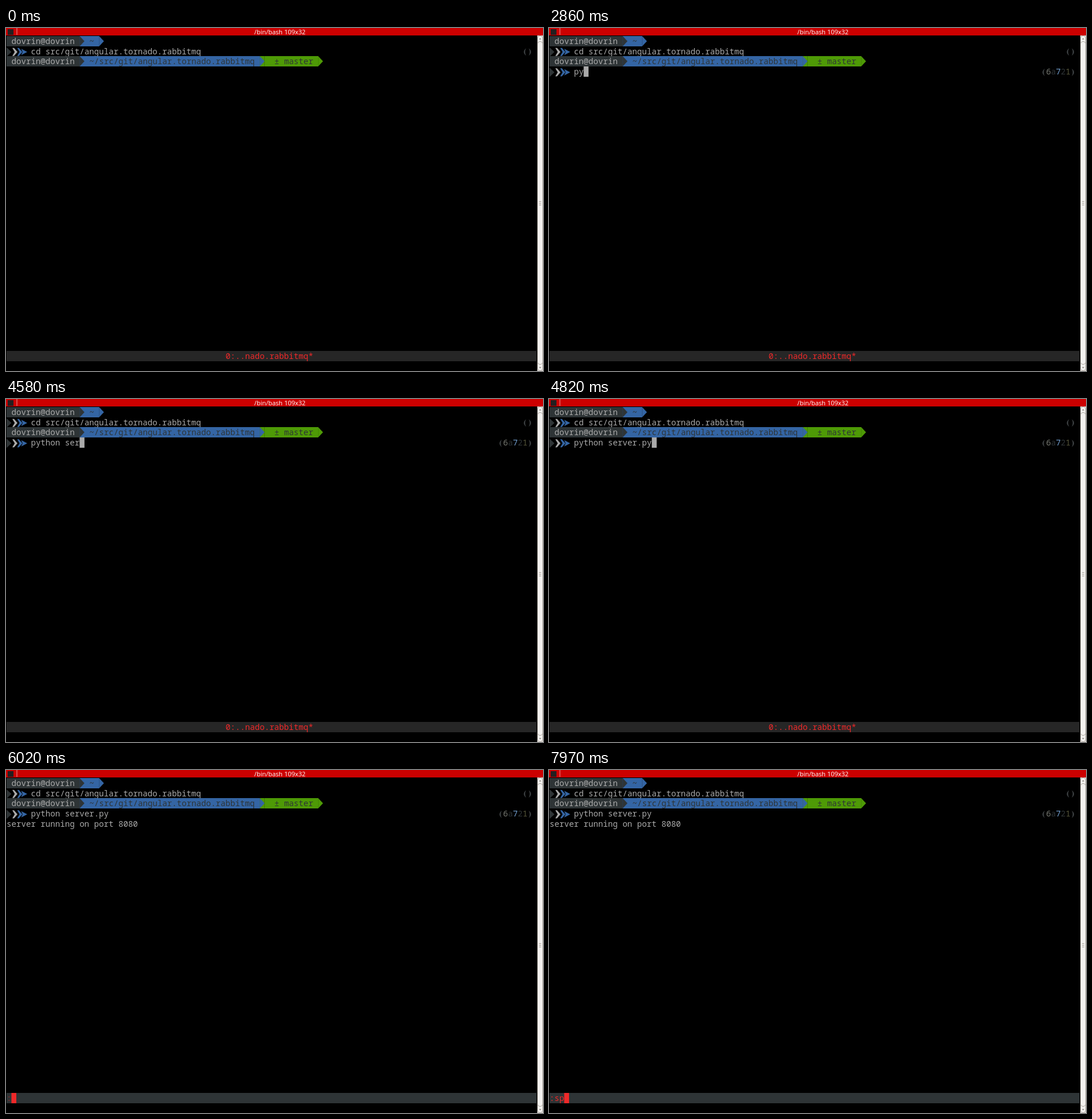
An HTML page that plays this animation: 936 px wide and 598 px high, repeating every 8 s.

```html
<!DOCTYPE html>
<html lang="en">
<head>
<meta charset="utf-8">
<title>Terminal session</title>
<style>
  html, body { margin: 0; width: 100%; height: 100%; overflow: hidden; background: #000; }
  svg { display: block; width: 936px; height: 598px; }
  text { font: 14.143px "Noto Sans Mono", "DejaVu Sans Mono", monospace; white-space: pre; }
  .title { font: 11px "Open Sans", "Noto Sans", sans-serif; }
</style>
</head>
<body>
<svg id="stage" viewBox="0 0 936 598" xmlns="http://www.w3.org/2000/svg"></svg>
<script>
const LOOP = 8000, CELL = 8.486, ROW = 17.725, COLS = 109, BAR = 31;
const GREY = '#aaaaaa', DARK = '#2e3436', BLUE = '#3465a4', GREEN = '#4e9a06', RED = '#ef2929';
const USER = 'dovrin@dovrin';

const colX = c => 1 + c * CELL;
const rowY = r => 14 + r * ROW;

const rect = (x, y, w, h, fill, extra = '') =>
  `<rect x="${x}" y="${y}" width="${w}" height="${h}" fill="${fill}" ${extra}/>`;
const path = (d, fill) => `<path d="${d}" fill="${fill}"/>`;
const text = (c, r, s, fill = GREY, extra = '') =>
  `<text x="${colX(c)}" y="${rowY(r) + 14}" fill="${fill}" ${extra}>${s}</text>`;
const cells = (c, r, n, fill) =>
  rect(colX(c), Math.round(rowY(r)), n * CELL, Math.round(rowY(r + 1)) - Math.round(rowY(r)), fill);
const arrow = (c, r, fill) => {
  const top = Math.round(rowY(r)), end = Math.round(rowY(r + 1));
  return path(`M${colX(c)},${top}L${colX(c + 1)},${(top + end) / 2}L${colX(c)},${end}z`, fill);
};

function banner(r, dir, branch) {
  const end = 18 + dir.length;
  let s = cells(1 - 1, r, 15, DARK) + cells(15, r, end - 15, BLUE) + arrow(15, r, DARK) +
    text(1, r, USER) + text(17, r, dir, DARK);
  if (!branch) return s + arrow(end, r, BLUE);
  const tail = end + 4 + branch.length;
  return s + cells(end, r, 1, GREEN) + arrow(end, r, BLUE) +
    cells(end + 1, r, tail - end - 1, GREEN) + text(end + 3, r, branch, DARK) + arrow(tail, r, GREEN);
}

function prompt(r) {
  const chevron = (x, fill) => path(`M${x},3h3l6,7l-6,7h-3l4.2,-7z`, fill);
  return `<g transform="translate(0 ${rowY(r)})">` + path('M1,2L9.5,10L1,18z', DARK) +
    chevron(11, GREY) + chevron(19.5, BLUE) + path('M26.5,4.5L37,10L26.5,15.5L29,10z', BLUE) + '</g>';
}

function parens(c, r) {
  const y = rowY(r) + 3.5;
  const curve = (x, d) => path(`M${x},${y}q${-8 * d},6.5 0,13q${-3.2 * d},-6.5 0,-13z`, '#3b3f41');
  return curve(colX(c) + 6, 1) + curve(colX(107) + 2.2, -1);
}

function hash(r) {
  const bold = 'font-weight="700"';
  return parens(101, r) + text(102, r, '6', '#74766f', bold) + text(103, r, 'a', DARK) +
    text(104, r, '7', '#729fcf', bold) + text(105, r, '2', DARK) + text(106, r, '1', '#56563a', bold);
}

function scrollbar() {
  const thumb = 'rx="4.5" stroke="#aaa49d" stroke-width="1"';
  const grip = [302, 305, 308].map(y => rect(929, y, 4, 1, '#aaa49d')).join('');
  return rect(926, 13, 10, 585, '#dedad6') + rect(926.5, 13.5, 9, 20, '#f3f1ef', thumb) +
    rect(926.5, 577, 9, 20.5, '#f3f1ef', thumb) + rect(926.5, 23.5, 9, 563, '#f3f1ef', thumb) + grip +
    path('M929,20l2,-2.5l2,2.5z', '#8f8a84') + path('M929,591l2,2.5l2,-2.5z', '#8f8a84');
}

const backdrop = rect(0, 0, 936, 598, '#000') + rect(0, 0, 936, 13, '#cc0000') +
  rect(3, 2, 10, 10, '#241f20') + rect(18.5, 0, 1, 12, '#e9a0a0') +
  '<text class="title" x="477.5" y="10.5" fill="#fff" text-anchor="middle">/bin/bash 109x32</text>' +
  scrollbar() + banner(0, '~') + prompt(1) + text(5, 1, 'cd src/git/angular.tornado.rabbitmq') +
  parens(106, 1) + banner(2, '~/src/git/angular.tornado.rabbitmq', '± master');

// [time, changes]; each step keeps what came before it
const STEPS = [
  [0, { ready: false, line: '', cursor: false, output: '', window: '0:..nado.rabbitmq*', command: null }],
  [110, { ready: true }],
  [210, { cursor: true }],
  [2860, { line: 'py' }],
  [3290, { line: 'pyt' }],
  [3430, { line: 'pyth' }],
  [3530, { line: 'pytho' }],
  [3710, { line: 'python', cursor: false }],
  [4160, { line: 'python s', cursor: true }],
  [4360, { line: 'python se' }],
  [4580, { line: 'python ser' }],
  [4820, { line: 'python server.py' }],
  [5110, { cursor: false, window: '0:python*' }],
  [5670, { output: 'server running on port 8080' }],
  [6020, { command: ':' }],
  [7480, { command: ':s' }],
  [7970, { command: ':sp' }]
];

function statusBar({ window: name, command }) {
  if (command === null) {
    return cells(0, BAR, COLS - .15, '#262626') + text(Math.ceil((COLS - 1 - name.length) / 2 - .5), BAR, name, RED);
  }
  const n = command.length;
  return cells(0, BAR, COLS - .15, DARK) + text(0, BAR, command, n > 1 ? RED : '#94302f') + cells(n, BAR, 1, RED);
}

function view(s) {
  let out = statusBar(s);
  if (s.ready) out += prompt(3) + hash(3) + text(5, 3, s.line);
  if (s.cursor) out += cells(5 + s.line.length, 3, 1, GREY);
  return out + text(0, 4, s.output);
}

const stage = document.getElementById('stage');
stage.innerHTML = backdrop + '<g id="live"></g>';
const live = document.getElementById('live');

let state = {};
const views = STEPS.map(([, change]) => view(state = { ...state, ...change }));
const start = performance.now();
let shown = -1;

function draw(now) {
  const t = Math.max(0, now - start) % LOOP;
  const i = STEPS.findLastIndex(([at]) => at <= t);
  if (i !== shown) live.innerHTML = views[shown = i];
  requestAnimationFrame(draw);
}
draw(start);
</script>
</body>
</html>
```
